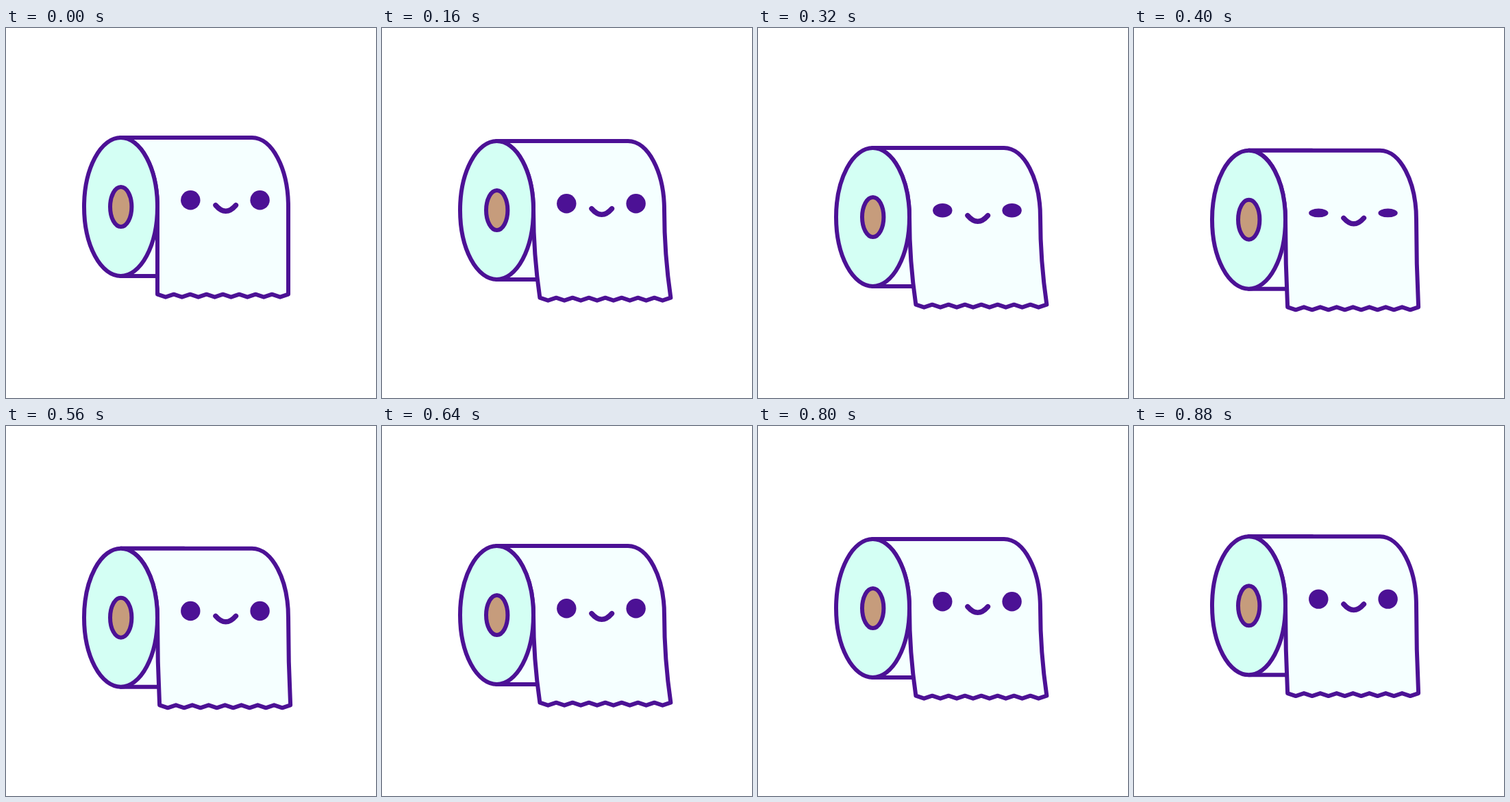
These frames come from a looping animation (540x540 px, 960 ms). An HTML page:

```html
<!DOCTYPE html>
<html lang="en">
<head>
<meta charset="utf-8">
<title>Happy paper roll</title>
<style>
  html, body { margin: 0; width: 100%; height: 100%; overflow: hidden; background: #fff; }
  svg { display: block; width: 100%; height: 100%; }
  .line { stroke: #4c1195; stroke-width: 6; stroke-linejoin: round; stroke-linecap: round; }
  .paper { fill: #f5ffff; }
  .eye { fill: #4c1195; }
</style>
</head>
<body>
<svg viewBox="0 0 540 540">
  <g id="roll">
    <path class="line paper" d="M167.5 160H260V362H167.5Z"/>
    <path class="line paper" id="sheet"/>
    <ellipse class="line" cx="167.5" cy="261" rx="53.5" ry="101" fill="#d4fff4"/>
    <ellipse class="line" cx="167.7" cy="261" rx="15.7" ry="29" fill="#c69c7c"/>
    <ellipse class="eye" cx="269.3" cy="251.3" rx="14.2" ry="14.2"/>
    <ellipse class="eye" cx="370.6" cy="251.3" rx="14.2" ry="14.2"/>
    <path class="line" d="M306 258.7Q320.7 275.7 335.4 258.7" fill="none" style="stroke-width:7.5"/>
  </g>
</svg>
<script>
const STEP = 80, STEPS = 12;
const LEFT = 221, RIGHT = 412, HEM = 388.7, TEETH = 16;
const roll = document.getElementById('roll');
const sheet = document.getElementById('sheet');
const eyes = document.querySelectorAll('.eye');

// Smooth rise from 0 to 1 and back over one unit
const wave = u => (1 - Math.cos(2 * Math.PI * u)) / 2;

function sheetPath(sway) {
  let d = `M167.5 160H359C388.3 160 ${RIGHT} 205.2 ${RIGHT} 261Q${RIGHT} 325 ${RIGHT + sway} ${HEM}`;
  for (let i = TEETH - 1; i >= 0; i--) {
    const x = LEFT + sway + (RIGHT - LEFT) * i / TEETH;
    d += `L${x} ${HEM + (i % 2) * 4}`;
  }
  return d + `Q${LEFT} 325 ${LEFT} 261A53.5 101 0 0 0 167.5 160Z`;
}

function draw(now) {
  const step = Math.floor(now / STEP) % STEPS;
  const u = step / STEPS;
  const blink = Math.abs(step - 5) < 2 ? wave((step - 3) / 4) : 0;
  roll.setAttribute('transform', `translate(0 ${20 * wave(u)})`);
  sheet.setAttribute('d', sheetPath(12.5 * wave(2 * u)));
  eyes.forEach(eye => eye.setAttribute('ry', 14.2 - 7.8 * blink));
}

const start = performance.now();
function tick() {
  draw(performance.now() - start);
  requestAnimationFrame(tick);
}
tick();
</script>
</body>
</html>
```
